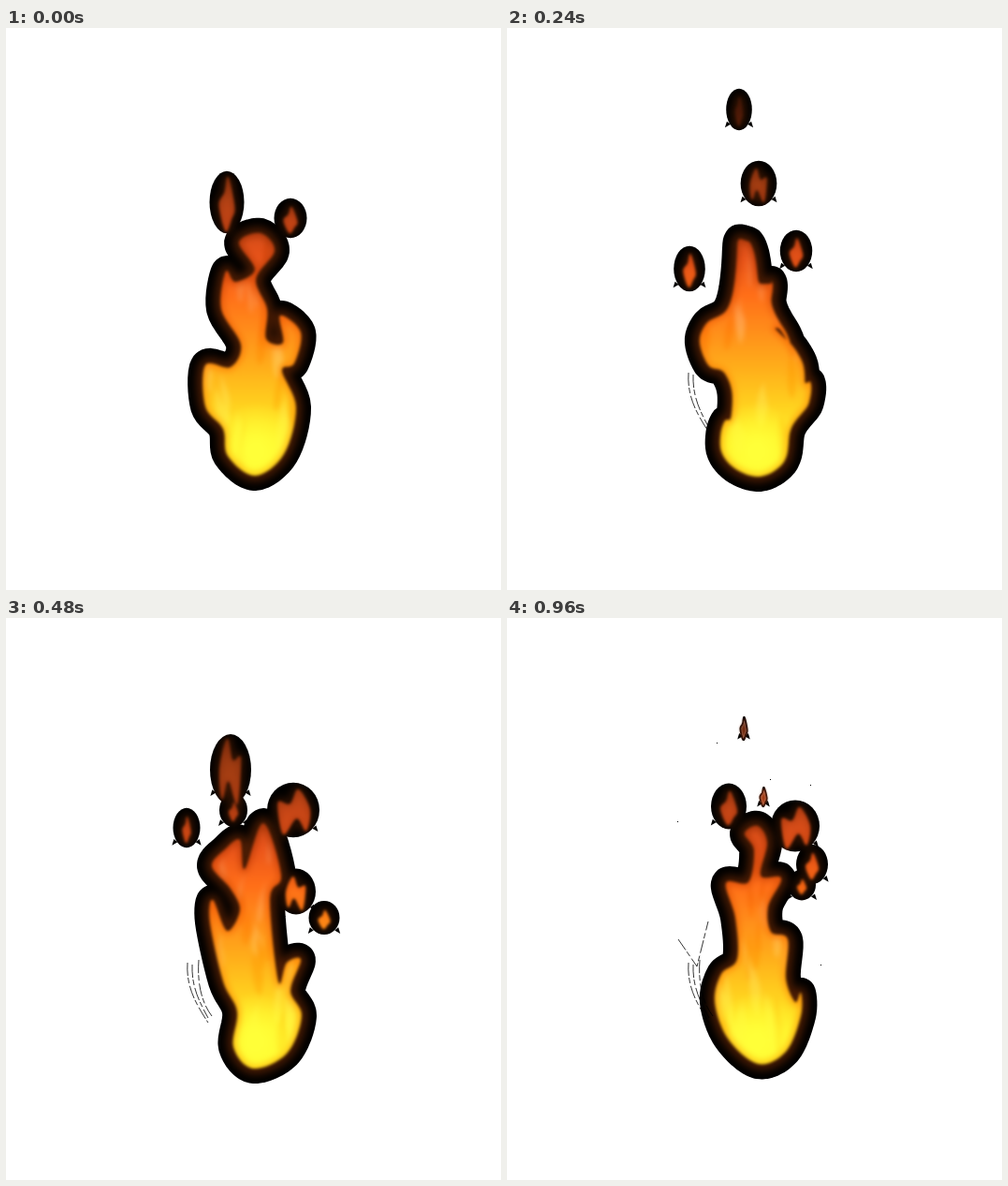
Animation of 529 by 600 pixels, one loop 1.04 s. Source, as an HTML page with a canvas:

```html
<!DOCTYPE html>
<html lang="en">
<head>
<meta charset="utf-8">
<title>Flame</title>
<style>
html, body { margin: 0; width: 100%; height: 100%; overflow: hidden; background: #fff; }
canvas { display: block; }
</style>
</head>
<body>
<canvas id="stage" width="529" height="600"></canvas>
<script>
const W = 529, H = 600, STEP = 80, STEPS = 13, HALO = 16;
const ctx = document.getElementById('stage').getContext('2d');
const layer = document.createElement('canvas');
layer.width = W;
layer.height = H;
const lit = layer.getContext('2d');
const poses = [];

const mix = (a, b, t) => a + (b - a) * t;

function random(seed) {
  return () => (seed = (seed * 16807) % 2147483647) / 2147483647;
}

function pairs(list) {
  const out = [];
  for (let i = 0; i < list.length; i += 2) out.push([list[i], list[i + 1]]);
  return out;
}

// Closed Catmull-Rom curve
function spline(pts, detail = 8) {
  const n = pts.length, out = [];
  for (let i = 0; i < n; i++) {
    const [a, b, c, d] = [n - 1, 0, 1, 2].map(k => pts[(i + k) % n]);
    for (let s = 0; s < detail; s++) {
      const t = s / detail;
      out.push([0, 1].map(k => b[k] + t / 2 * (c[k] - a[k] +
        t * (2 * a[k] - 5 * b[k] + 4 * c[k] - d[k] + t * (3 * (b[k] - c[k]) + d[k] - a[k])))));
    }
  }
  return out;
}

function resample(pts, count) {
  const ring = [...pts, pts[0]], len = [0];
  for (let i = 1; i < ring.length; i++) {
    len.push(len[i - 1] + Math.hypot(ring[i][0] - ring[i - 1][0], ring[i][1] - ring[i - 1][1]));
  }
  const total = len[len.length - 1], out = [];
  for (let i = 0, j = 1; i < count; i++) {
    const d = total * i / count;
    while (len[j] < d) j++;
    const t = (d - len[j - 1]) / (len[j] - len[j - 1] || 1);
    out.push([0, 1].map(k => mix(ring[j - 1][k], ring[j][k], t)));
  }
  return out;
}

function morph(a, b, t) {
  const p = resample(a, 240), q = resample(b, 240);
  return p.map((v, i) => v.map((n, k) => mix(n, q[i][k], t)));
}

function outline(pts) {
  const path = new Path2D();
  pts.forEach(p => path.lineTo(p[0], p[1]));
  path.closePath();
  return path;
}

// Streaks inside the body: x, y, width, height, lean, light
function scatter(shape, seed) {
  const rnd = random(seed), out = [];
  while (out.length < 17) {
    const x = mix(200, 340, rnd()), y = mix(215, 455, rnd());
    if (!ctx.isPointInPath(shape, x, y)) continue;
    const size = mix(.5, 1, (y - 215) / 240);
    out.push([x, y, mix(8, 17, rnd()) * size, mix(45, 75, rnd()) * size, mix(-9, 9, rnd()), out.length % 5 < 3]);
  }
  return out;
}

// body: outline from the base, clockwise; sparks: x, y, width, height
function pose(body, ...sparks) {
  const curve = spline(pairs(body));
  poses.push({ body: curve, sparks, licks: scatter(outline(curve), 71 + poses.length * 913) });
}

// Colours from y = 90 down to y = 480
function ramp(...colors) {
  const g = ctx.createLinearGradient(0, 90, 0, 480);
  colors.forEach((c, i) => g.addColorStop(i / (colors.length - 1), c));
  return g;
}
const FIRE = ramp('#541c08', '#92340e', '#a63e12', '#c84616', '#ea541a', '#ff6e18',
  '#ff8e1a', '#ffae1a', '#ffd01e', '#fff028', '#ffff30');
const RIM = ramp('#3c1204', '#6e2408', '#8c2c08', '#ca4008', '#f46408', '#ff8a08', '#ffa40c', '#ffc010');
const LIGHT = ramp('#8c3812', '#b44c1c', '#d25c28', '#f47638', '#ffa04a', '#ffcc48', '#fff03c', '#ffff44');
const DARK = ramp('#702008', '#8e2c08', '#b43808', '#e04808', '#ff7408', '#ffa008', '#ffc00c', '#ffdc18');

pose([266,478, 237,457, 232,428, 213,404, 213,360, 240,362, 251,338, 230,300, 235,260, 245,271,
  266,258, 249,229, 272,219, 287,238, 267,268, 279,300, 278,332, 296,336, 293,307, 315,325,
  308,358, 295,366, 310,405, 297,455],
  [236,188,17,58], [304,205,15,28]);
pose([266,478, 236,460, 238,385, 208,360, 199,332, 236,312, 252,272, 257,207, 275,250, 272,302,
  252,322, 262,343, 293,354, 289,318, 318,320, 328,380, 303,410, 298,460],
  [269,188,22,42], [309,260,17,36], [195,279,16,42], [248,109,9,36], [310,185,6,14]);
pose([267,480, 226,455, 221,430, 230,415, 240,425, 243,368, 222,360, 212,308, 236,285, 240,205,
  263,258, 265,300, 288,270, 296,237, 326,295, 316,327, 290,310, 284,345, 308,378, 310,402,
  321,371, 337,402, 305,423, 297,463],
  [259,200,14,48], [280,235,14,30], [207,262,30,36], [195,222,9,14], [272,154,6,15]);
pose([264,481, 243,458, 247,420, 232,388, 218,325, 221,301, 236,334, 250,312, 240,289, 220,265,
  234,247, 250,237, 255,268, 275,219, 294,275, 282,300, 291,388, 300,368, 315,365, 304,398,
  316,425, 300,465],
  [240,164,24,70], [243,207,10,20], [307,207,-36,48], [310,294,22,36], [340,322,13,20], [193,226,9,28]);
pose([268,484, 241,455, 249,412, 243,345, 227,300, 251,266, 258,246, 262,285, 256,325, 276,333,
  271,298, 276,283, 302,310, 303,352, 290,385, 302,440, 294,474],
  [248,199,28,72], [267,238,18,34], [285,214,9,22], [236,121,10,46], [309,170,12,46], [223,264,9,24]);
pose([268,478, 243,450, 245,405, 233,365, 255,342, 246,288, 262,281, 287,264, 279,305, 285,362,
  303,382, 311,368, 304,333, 321,372, 304,405, 299,455],
  [239,241,28,46], [307,252,-40,38], [272,206,11,30], [251,152,9,26], [236,93,3,14], [311,124,8,20]);
pose([268,476, 236,449, 222,410, 229,380, 246,364, 244,320, 234,283, 258,282, 264,248, 254,230,
  268,222, 278,240, 271,275, 293,278, 279,308, 282,335, 300,343, 298,385, 308,410, 314,400,
  314,425, 298,463],
  [237,203,18,36], [308,224,-32,44], [326,265,14,28], [315,287,10,16], [274,191,7,20], [253,118,7,24]);

const LEAF = [.08,-.5, .5,.05, .3,.28, -.08,.5, -.5,.02, -.15,-.22];
const TUFT = [-.15,-.5, .1,-.18, .46,-.2, .3,.5, -.1,.15, -.38,.42, -.5,-.05];

function sparkPath([x, y, w, h]) {
  const unit = pairs(Math.abs(w) > 18 ? TUFT : LEAF);
  return outline(spline(unit.map(([u, v]) => [x + u * w, y + v * h])));
}

function lickPath([x, y, w, h, lean]) {
  const p = new Path2D(), top = y - h / 2, low = y + h / 2;
  p.moveTo(x + lean, top);
  p.bezierCurveTo(x + lean * .3, y - h * .2, x + w * .7, y, x + w * .4, y + h * .2);
  p.quadraticCurveTo(x + w * .2, low, x - lean * .4, low);
  p.bezierCurveTo(x - w * .4, low, x - w * .8, y, x + lean, top);
  return p;
}

function barb(x, y, dx, dy) {
  ctx.beginPath();
  ctx.moveTo(x - dy * .4, y + dx * .4);
  ctx.lineTo(x + dx, y + dy);
  ctx.lineTo(x + dy * .4, y - dx * .4);
  ctx.fill();
}

function drawHalo(body, shape, sparks, k) {
  ctx.fillStyle = ctx.strokeStyle = '#000';
  ctx.lineJoin = 'round';
  ctx.lineWidth = HALO * 2;
  ctx.stroke(shape);
  ctx.fill(shape);
  for (const [x, y, w, h, bare] of sparks) {
    const rx = bare ? w / 2 : Math.abs(w) / 2 + 10, ry = bare ? h / 2 : h * .4 + 10;
    if (bare) {
      ctx.lineWidth = 2;
      ctx.stroke(sparkPath([x, y, w, h]));
    } else {
      ctx.beginPath();
      ctx.ellipse(x, y - 2, rx, ry, 0, 0, Math.PI * 2);
      ctx.fill();
    }
    if (k) for (const s of [-1, 1]) barb(x + s * rx * .8, y + ry * .55, s * 4, 5);
  }
  if (!k) return;
  // Ragged edge
  const ring = resample(body, 42);
  ring.forEach((p, i) => {
    if ((i * 7 + k * 5) % 9 > 1) return;
    const a = ring[(i + 41) % 42], b = ring[(i + 1) % 42];
    const d = Math.hypot(b[0] - a[0], b[1] - a[1]) || 1;
    const nx = (a[1] - b[1]) / d, ny = (b[0] - a[0]) / d;
    barb(p[0] + nx * 14, p[1] + ny * 14, nx * 5, ny * 5 - 2);
  });
}

// Thin scratches that stay once they have appeared
function drawScratches(k) {
  const marks = [
    [2, 'M194 368C192 395 205 415 216 432'],
    [2, 'M199 370C198 395 208 412 216 427'],
    [6, 'M206 365C204 392 210 412 220 425'],
    [8, 'M183 343L203 372L215 324']
  ];
  ctx.lineWidth = .8;
  ctx.setLineDash([14, 2, 6, 3]);
  for (const [from, d] of marks) if (k >= from) ctx.stroke(new Path2D(d));
  ctx.setLineDash([]);
  const dots = [[8, 182, 217], [8, 335, 370], [9, 224, 133], [9, 281, 172], [10, 324, 178]];
  for (const [from, x, y] of dots) if (k >= from) ctx.fillRect(x, y, 1, 1);
}

function paintFire(shape, sparks, licks) {
  lit.clearRect(0, 0, W, H);
  lit.globalCompositeOperation = 'source-over';
  lit.fillStyle = FIRE;
  lit.fill(shape);
  const tips = sparks.map(sparkPath);
  tips.forEach(p => lit.fill(p));

  lit.globalCompositeOperation = 'source-atop';
  lit.filter = 'blur(2px)';
  lit.globalAlpha = .7;
  for (const lick of licks) {
    lit.fillStyle = lick[5] ? LIGHT : DARK;
    lit.fill(lickPath(lick));
  }
  lit.filter = 'none';
  lit.globalAlpha = 1;
  const core = lit.createRadialGradient(267, 452, 8, 267, 446, 46);
  core.addColorStop(0, '#ffff38');
  core.addColorStop(1, '#ffff3800');
  lit.fillStyle = core;
  lit.fillRect(200, 390, 140, 100);

  lit.filter = 'blur(3px)';
  lit.globalAlpha = .9;
  lit.strokeStyle = RIM;
  lit.lineWidth = 7;
  lit.stroke(shape);
  lit.lineWidth = 3;
  tips.forEach(p => lit.stroke(p));
  lit.globalAlpha = 1;
  lit.filter = 'none';
}

function draw(k) {
  const now = poses[k >> 1];
  let { body, sparks, licks } = now;
  sparks = sparks.map(([x, y, w, h]) => [x, y, w, h, Math.abs(w) < 9]);
  if (k % 2) {
    // Halfway: the outline blends on while loose parts rise and shrink
    body = morph(body, poses[(k >> 1) + 1].body, .5);
    sparks = sparks.filter(s => !s[4]).map(([x, y, w, h]) => [x, y - 20, w * .85, h * .85, false]);
    licks = licks.map(([x, y, ...rest]) => [x, y - 16, ...rest]);
  }
  const shape = outline(body);
  ctx.clearRect(0, 0, W, H);
  drawHalo(body, shape, sparks, k);

  ctx.globalCompositeOperation = 'source-atop';
  ctx.filter = 'blur(5px)';
  ctx.strokeStyle = '#4a1c04';
  ctx.lineWidth = 12;
  ctx.stroke(shape);
  ctx.lineWidth = 5;
  sparks.filter(s => !s[4]).forEach(s => ctx.stroke(sparkPath(s)));
  ctx.filter = 'none';
  ctx.globalCompositeOperation = 'source-over';

  ctx.fillStyle = ctx.strokeStyle = '#000';
  drawScratches(k);
  paintFire(shape, sparks, licks);
  ctx.filter = 'blur(1.4px)';
  ctx.drawImage(layer, 0, 0);
  ctx.filter = 'none';
}

let shown = -1;
function tick() {
  const k = Math.floor(performance.now() / STEP) % STEPS;
  if (k !== shown) draw(shown = k);
  requestAnimationFrame(tick);
}
tick();
</script>
</body>
</html>
```
